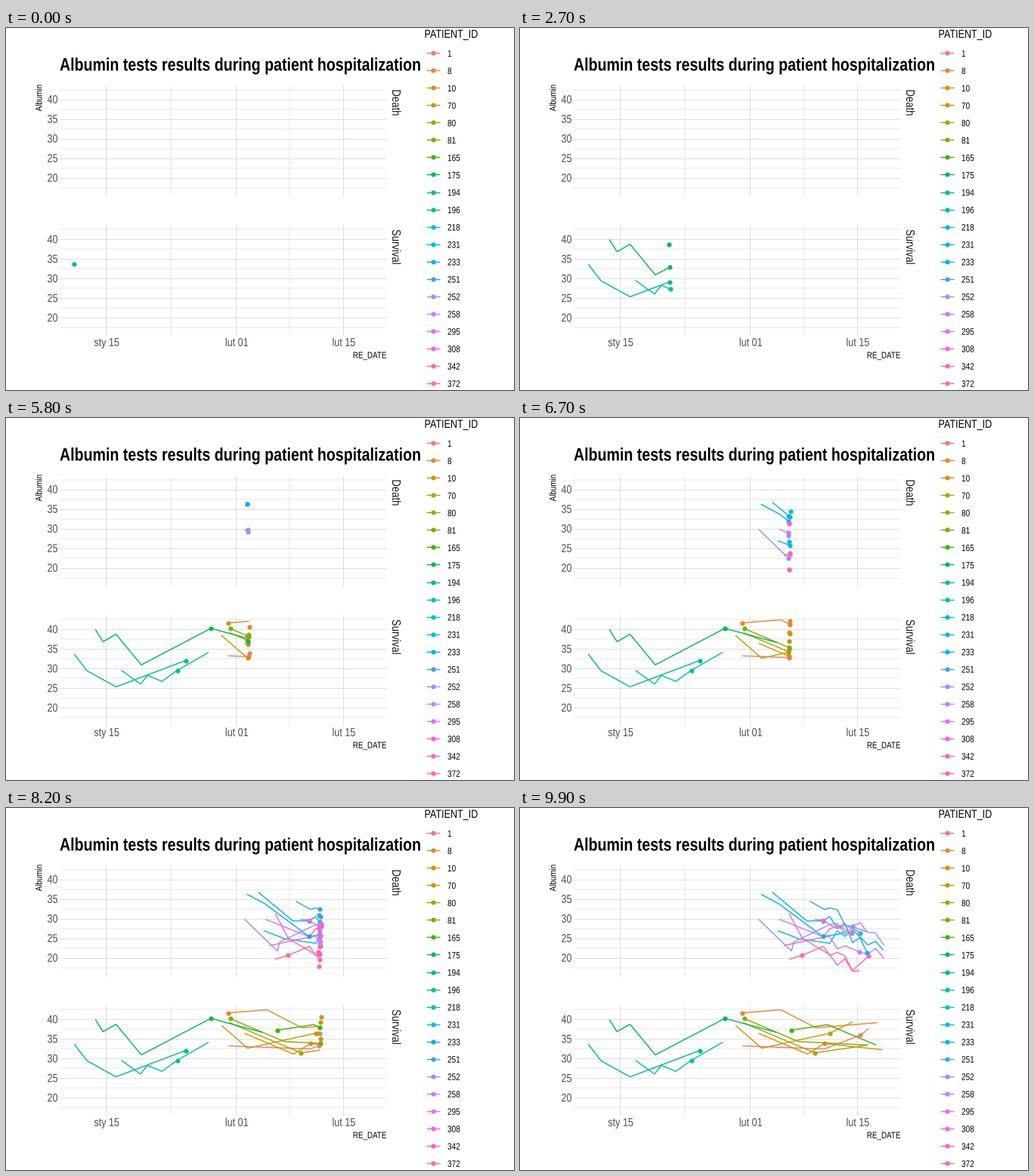
Write a matplotlib script that moves like this. It is 672 px wide and 480 px high and loops after 10 s.

```python
import matplotlib.pyplot as plt
import numpy as np
from matplotlib.animation import FuncAnimation
from matplotlib.patches import PathPatch
from matplotlib.textpath import TextPath
from matplotlib.transforms import Affine2D

W, H, FRAMES = 672, 480, 100
PX = 0.75                        # points per pixel at 96 dpi
NARROW = 0.82                    # condensed face of the sans family
FIRST_DAY, LAST_DAY = 10.85, 49.6   # days since the start of January
TOPS = {"Death": 76, "Survival": 261.5}

COLORS = dict(zip(
    (1, 8, 10, 70, 80, 81, 165, 175, 194, 196,
     218, 231, 233, 251, 252, 258, 295, 308, 342, 372),
    ("#F8766D #EA8331 #D89000 #C09B00 #A3A500 #7CAE00 #39B600 #00BB4E "
     "#00BF7D #00C1A3 #00BFC4 #00BAE0 #00B0F6 #35A2FF #9590FF #C77CFF "
     "#E76BF3 #FA62DB #FF62BC #FF6A98").split()))

# Key tests (day, albumin) in record order; the last record's dot stays.
SURVIVAL = {
    1: [(47.5, 37.6), (31, 33.2), (41.7, 32.4), (46.4, 35.9)],
    8: [(48.6, 39.1), (36, 42.4), (40.6, 37.8), (31, 41.6)],
    10: [(49.3, 32.2), (33.1, 36.4), (39.5, 31.1), (41.7, 33.8)],
    70: [(45.4, 39.3), (30.1, 38.4), (33.5, 32.6), (42.4, 36.4)],
    80: [(47.4, 33.4), (31.1, 39.1), (40.5, 31.4)],
    81: [(47.4, 33.4), (38.3, 34.3), (31.3, 40.1)],
    165: [(48.5, 33.4), (42.1, 38.6), (37.4, 37.2)],
    175: [(35.5, 36.6), (13.6, 39.9), (14.6, 36.8), (16.3, 38.7),
          (19.6, 30.9), (28.7, 40.2)],
    194: [(10.85, 33.6), (12.5, 29.4), (16.3, 25.3), (25.4, 32)],
    196: [(17, 29.5), (19.5, 26), (20.4, 28.2), (22.3, 26.7), (28.4, 34.1),
          (24.3, 29.5)],
}
DEATH = {
    218: [(49.4, 21.9), (34.9, 36.7), (39.4, 29.4), (41.5, 29.4)],
    231: [(46.3, 25.4), (35.6, 26.9), (38.4, 24.8), (47.3, 21.2)],
    233: [(44.5, 26.7), (33.4, 36.2), (35.8, 33.7), (41.5, 25.4)],
    251: [(45.4, 27.5), (39.8, 34.4), (41.7, 32.3), (46.4, 26.3)],
    252: [(49.5, 23.1), (33.1, 29.8), (37.4, 21.7), (37.7, 24), (45.4, 27.9)],
    258: [(49.5, 19.8), (35.8, 29.8), (41.5, 25.4), (46.3, 21.5)],
    295: [(47.3, 26.5), (40.4, 29.8), (41.5, 29.6)],
    308: [(45.3, 16.7), (37.1, 31.3), (38.8, 25), (47.5, 20.4)],
    342: [(43.5, 28.3), (36.4, 23.1), (41.5, 25.2), (45.3, 26.2)],
    372: [(41.6, 22.9), (46.3, 16.7), (37.1, 19.6), (38.8, 20.6)],
}


def with_daily(keys, rng):
    """Prepend the daily tests of the last weeks, scattered around the keys."""
    days, values = np.array(sorted(keys)).T
    daily = [(d, np.interp(d, days, values) + rng.uniform(-2.2, 2.2))
             for d in np.arange(42.4, days[-1])
             if abs(days - d).min() > 0.5]
    return daily + keys


def day_x(day):
    return 132.9 + 10.12 * (day - 15)


def value_y(value, top):
    return top + 19 + 5.2 * (40 - value)


fig = plt.figure(figsize=(W / 96, H / 96), dpi=96, facecolor="white")
ax = fig.add_axes([0, 0, 1, 1])
ax.set(xlim=(0.5, W + 0.5), ylim=(H + 0.5, 0.5))
ax.axis("off")


def text(x, y, s, size, color="black", align=0, rot=0, weight="normal"):
    """Condensed text with its baseline at y, aligned 0 left to 1 right."""
    path = TextPath((0, 0), s, size=size,
                    prop=dict(family="Liberation Sans", weight=weight))
    shift = -align * path.get_extents().x1
    place = (Affine2D().translate(shift, 0).scale(NARROW, 1)
             .rotate_deg(rot).scale(1, -1).translate(x, y))
    ax.add_patch(PathPatch(place.transform_path(path), fc=color, lw=0))


def rule(xs, ys, major):
    ax.plot(xs, ys, color="#cccccc", lw=(0.62 if major else 0.45) * PX,
            zorder=1, solid_capstyle="butt")


def draw_panel(name, top):
    for day in (15, 23.5, 32, 39, 46):
        x = day_x(day)
        rule([x, x], [top, top + 147], day in (15, 32, 46))
    for value in np.arange(42.5, 17, -2.5):
        y = value_y(value, top)
        rule([71.5, 503], [y, y], value % 5 == 0)
        if value % 5 == 0:
            text(68.5, y + 5.3, f"{value:.0f}", 15.33, "#4D4D4D", align=1)
    text(511.5, top + 6, name, 16, "#1A1A1A", rot=-90)


def draw_legend():
    text(554, 13.5, "PATIENT_ID", 15.33)
    for i, (pid, color) in enumerate(COLORS.items()):
        y = 33.7 + 23.04 * i
        ax.plot([556.5, 574.9], [y, y], color=color, lw=1.42 * PX,
                solid_capstyle="butt")
        ax.plot(565.7, y, "o", color=color, ms=6.2 * PX, mew=0)
        text(584.5, y + 4.9, str(pid), 12.27)


for name, top in TOPS.items():
    draw_panel(name, top)
draw_legend()
text(71.5, 57, "Albumin tests results during patient hospitalization", 23.9,
     weight="bold")
text(48, 76, "Albumin", 12, align=1, rot=90)
text(503.5, 438.3, "RE_DATE", 12, align=1)
for day, label in ((15, "sty 15"), (32, "lut 01"), (46, "lut 15")):
    text(day_x(day) + 0.5, 422.3, label, 15.33, "#4D4D4D", align=0.5)


def step_of(row):
    return round((row[0] - FIRST_DAY) / (LAST_DAY - FIRST_DAY) * (FRAMES - 1))


def between(a, b, t):
    u = (t - step_of(a)) / (step_of(b) - step_of(a))
    return a[0] + u * (b[0] - a[0]), a[1] + u * (b[1] - a[1])


def trail(rows, t):
    """The line so far, by date."""
    rows = sorted(rows)
    seen = [r for r in rows if step_of(r) <= t]
    if seen and len(seen) < len(rows):
        seen.append(between(seen[-1], rows[len(seen)], t))
    return seen


def dots(rows, t):
    """One dot for every pair of neighbouring records around now."""
    out = []
    for a, b in zip(rows, rows[1:]):
        lo, hi = sorted((step_of(a), step_of(b)))
        if lo <= t < hi:
            out.append(between(a, b, t))
    if step_of(rows[-1]) <= t:
        out.append(rows[-1])
    return out


rng = np.random.default_rng(4)
tracks = []


def add_track(pid, rows, top):
    style = dict(color=COLORS[pid], solid_capstyle="butt")
    line, = ax.plot([], [], lw=1.42 * PX, zorder=3, **style)
    mark, = ax.plot([], [], "o", ms=6.2 * PX, mew=0, zorder=4, **style)
    tracks.append((rows, top, line, mark))


for pid, rows in SURVIVAL.items():
    add_track(pid, rows, TOPS["Survival"])
for pid, keys in DEATH.items():
    add_track(pid, with_daily(keys, rng), TOPS["Death"])


def update(t):
    for rows, top, line, mark in tracks:
        for artist, rule_of in ((line, trail), (mark, dots)):
            days, values = np.reshape(rule_of(rows, t), (-1, 2)).T
            artist.set_data(day_x(days), value_y(values, top))
    return [a for *_, line, mark in tracks for a in (line, mark)]


anim = FuncAnimation(fig, update, frames=FRAMES, interval=100,
                     repeat=True, repeat_delay=0, blit=False)
plt.show()
```
